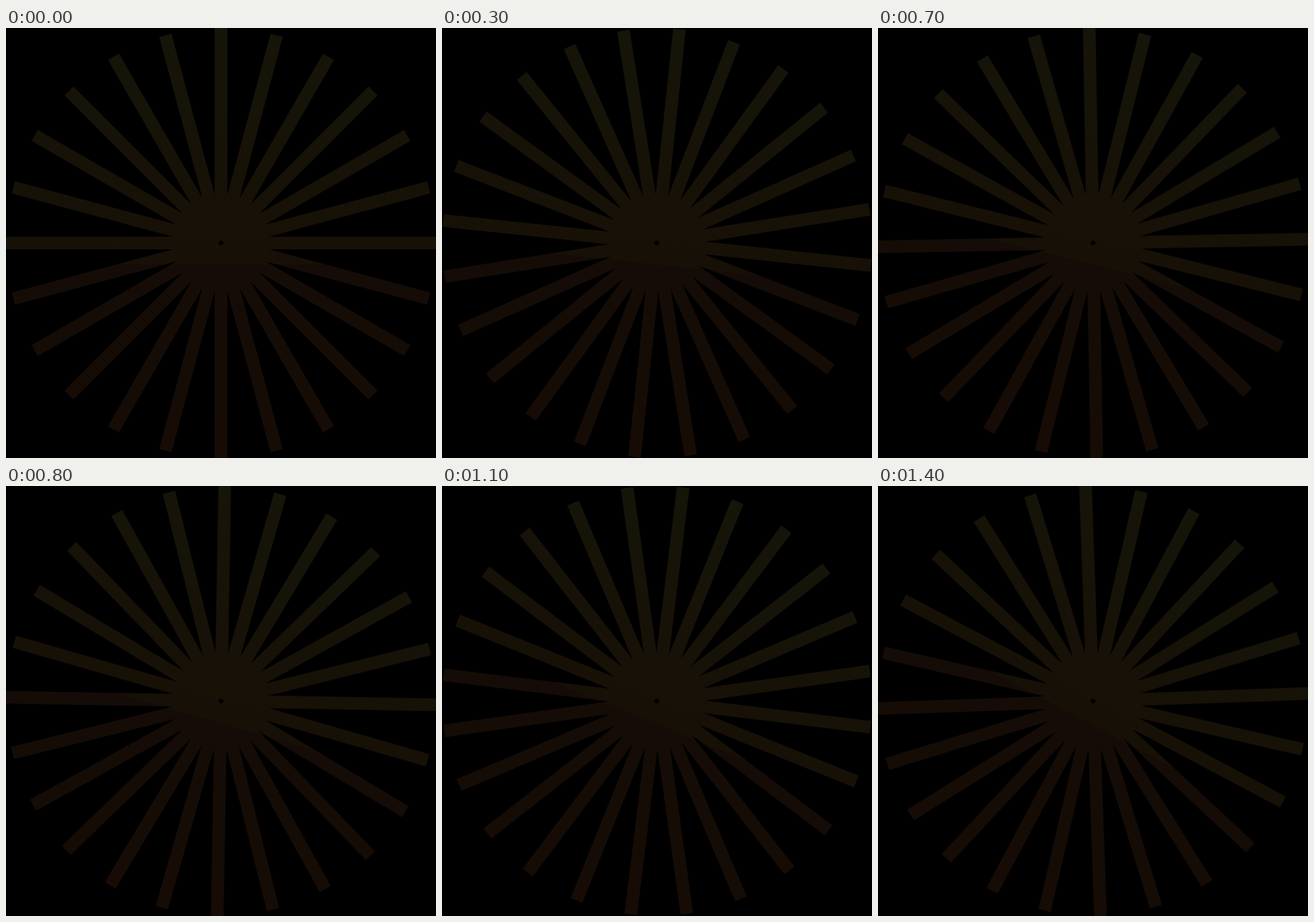
These frames come from a looping animation (748 by 748 pixels, 1500 ms). An HTML page:

```html
<!DOCTYPE html>
<html lang="en">
<head>
<meta charset="utf-8">
<title>Turning spokes</title>
<style>
  html, body { margin: 0; width: 100%; height: 100%; overflow: hidden; background: #000; }
  svg { display: block; width: 748px; height: 748px; }
  #wheel { transform-origin: 374px 374px; }
</style>
</head>
<body>
<svg viewBox="0 0 748 748">
  <defs>
    <linearGradient id="tint" gradientUnits="userSpaceOnUse" x1="0" y1="0" x2="0" y2="748">
      <stop offset="0" stop-color="#161509"/>
      <stop offset=".55" stop-color="#171006"/>
      <stop offset=".55" stop-color="#150c07"/>
      <stop offset="1" stop-color="#160c05"/>
    </linearGradient>
  </defs>
  <g id="wheel">
    <path id="spokes" fill="none" stroke="url(#tint)" stroke-width="22"/>
    <circle cx="374" cy="374" r="4"/>
  </g>
</svg>
<script>
  const C = 374, SPOKES = 24, STEPS = 15, LOOP = 1500;

  // Each line crosses the hub and forms two opposite spokes.
  let d = '';
  for (let i = 0; i < SPOKES / 2; i++) {
    const a = i * 2 * Math.PI / SPOKES;
    const x = C * Math.sin(a), y = C * Math.cos(a);
    d += `M${C - x} ${C - y}L${C + x} ${C + y}`;
  }
  document.getElementById('spokes').setAttribute('d', d);

  document.getElementById('wheel').animate(
    [{ transform: 'rotate(0deg)' }, { transform: 'rotate(30deg)' }],
    { duration: LOOP, iterations: Infinity, easing: `steps(${STEPS}, end)` }
  );
</script>
</body>
</html>
```
